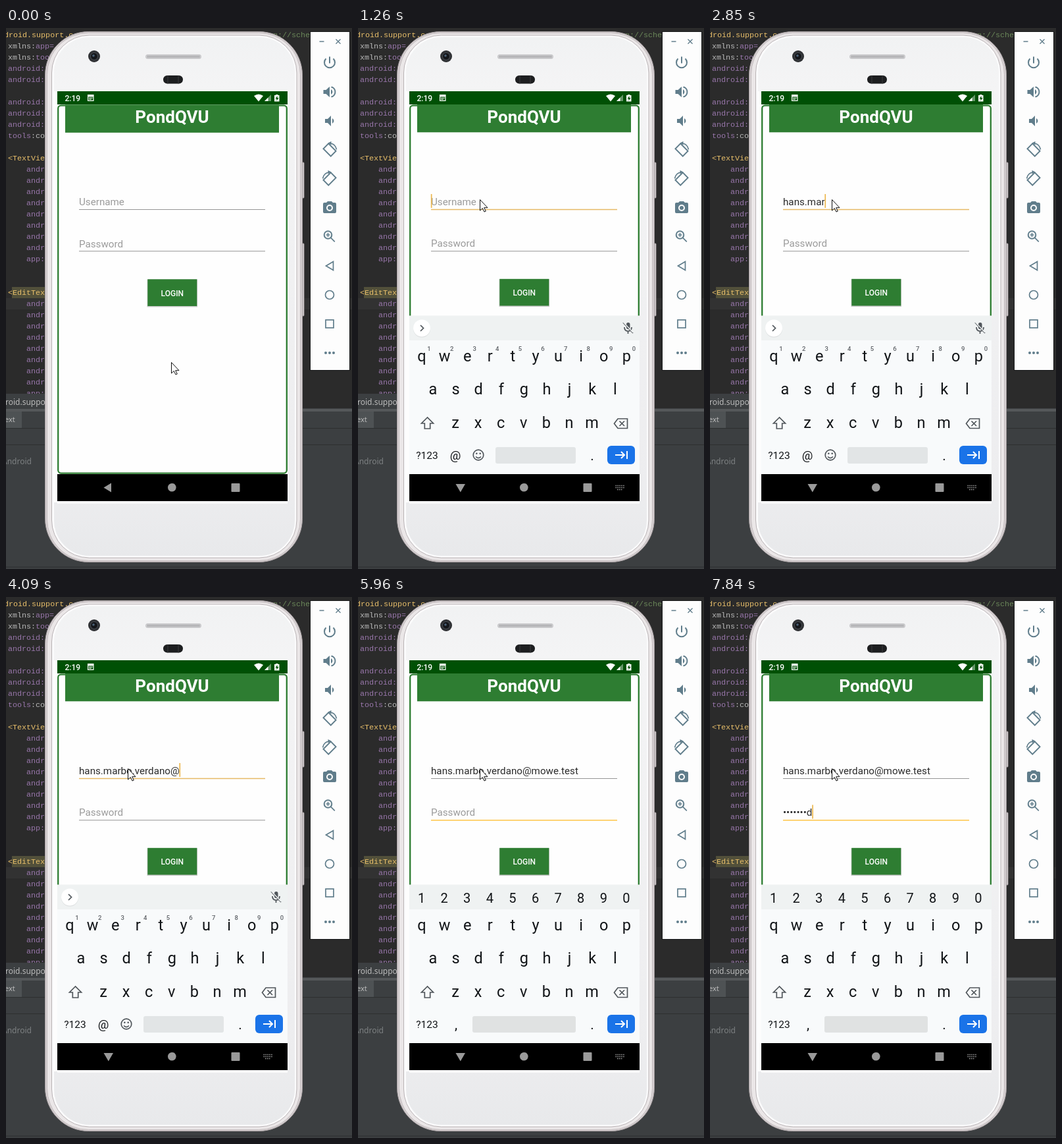
These frames come from a looping animation (526 px wide and 821 px high, 8000 ms). An HTML page:

```html
<!DOCTYPE html>
<html lang="en">
<head>
<meta charset="utf-8">
<title>Login form demo</title>
<style>
html, body { margin: 0; width: 100%; height: 100%; overflow: hidden; background: #3c3f41; }
svg { display: block; font-family: Roboto, sans-serif; }
text { white-space: pre; }
.mono { font: 11.7px "Liberation Mono", monospace; }
.ide { font: 12px "Noto Sans", sans-serif; fill: #bbb; }
.field { font-size: 15.2px; }
.key { text-anchor: middle; fill: #111417; }
.icon { fill: none; stroke: #607d8b; stroke-width: 2; }
.solid { fill: #607d8b; stroke: none; }
</style>
</head>
<body>
<svg width="526" height="821" viewBox="0 0 526 821">
  <defs>
    <linearGradient id="face" x2="0" y2="1">
      <stop stop-color="#f1f2f3"/><stop offset=".1" stop-color="#f4f4f5"/>
      <stop offset=".85" stop-color="#ededef"/><stop offset="1" stop-color="#e8e9eb"/>
    </linearGradient>
    <clipPath id="screen"><rect x="78" y="96" width="350" height="581"/></clipPath>
  </defs>

  <!-- code editor -->
  <rect width="526" height="577" fill="#2b2b2b"/>
  <rect y="410" width="526" height="17" fill="#323232"/>
  <rect x="9" y="393" width="60" height="17" fill="#52503a"/>
  <g id="code" class="mono"></g>
  <rect y="555" width="250" height="23" fill="#3c3f41"/>
  <rect y="577" width="526" height="244" fill="#3c3f41"/>
  <rect y="578" width="526" height="4" fill="#55585a"/>
  <rect y="582" width="24" height="25" fill="#4e5254"/>
  <path d="M0 607.5H526M0 632.5H526M0 818H526" stroke="#2d2f30"/>
  <g class="ide">
    <text x="-1" y="572">roid.support</text>
    <text x="-2" y="598" font-size="11">ext</text>
    <text x="-6" y="662" style="fill:#7d8082">Android</text>
  </g>

  <!-- phone -->
  <g fill="#d9d4d6" stroke="#a39c9e">
    <rect x="448" y="204" width="5" height="54" rx="1"/>
    <rect x="448" y="327" width="5" height="110" rx="1"/>
    <rect x="59.5" y="5.5" width="391" height="805" rx="66" fill="#d6d0d2"/>
  </g>
  <rect x="62.5" y="7.5" width="385" height="801" rx="63" fill="#ebe7e8" stroke="#c4bdbf"/>
  <rect x="69.5" y="11" width="372.500" height="793" rx="57" fill="#fbfbfc" stroke="#b9b3b5"/>
  <rect x="73" y="14" width="366" height="787" rx="54" fill="url(#face)"/>
  <rect x="73" y="96" width="5" height="624" fill="#fdfdfd"/>
  <rect x="78" y="718" width="350" height="4" fill="#fafafb"/>
  <circle cx="134" cy="43" r="9" fill="#2f3134"/>
  <circle cx="134" cy="43" r="5.5" fill="#14161a" stroke="#4b4f55"/>
  <circle cx="133" cy="42" r="1.8" fill="#4a6076"/>
  <rect x="212" y="40" width="85" height="7" rx="3.5" fill="#c9c9cb"/>
  <path d="M215 43.5H295" stroke="#a3a3a6" stroke-width="3" stroke-dasharray="1 1"/>
  <rect x="239" y="72" width="30" height="12.5" rx="6.2" fill="#1d1e20"/>
  <path d="M246 72v12.500M262 72v12.500" stroke="#3a3b3d"/>

  <!-- app -->
  <rect x="78" y="96" width="350" height="581" fill="#fefefe"/>
  <rect x="79.200" y="117.600" width="347.600" height="558" rx="4.500" fill="none" stroke="#2e7d32" stroke-width="2.300"/>
  <g id="form">
    <rect x="90" y="116" width="325" height="42.300" fill="#2e7d32"/>
    <text x="252.500" y="143.500" text-anchor="middle" font-size="26" font-weight="700" fill="#fff">PondQVU</text>
    <text id="user" class="field" x="111" y="268.500"></text>
    <text id="pass" class="field" x="111" y="332.300"></text>
    <rect x="214.500" y="381" width="76.500" height="42" fill="#000" fill-opacity=".2"/>
    <rect x="215.300" y="380.800" width="75" height="40.700" fill="#2e7d32"/>
    <text x="252.800" y="406" text-anchor="middle" font-size="12" font-weight="500" fill="#fff">LOGIN</text>
  </g>
  <path id="userLine" d="M111 275.500H394"/>
  <path id="passLine" d="M111 338.700H394"/>
  <rect id="caret" width="1.700" height="21" fill="#ecb74e"/>

  <rect x="78" y="96" width="350" height="20" fill="#005005"/>
  <g fill="#fff">
    <text x="89.500" y="110.500" font-size="12" font-weight="500">2:19</text>
    <path d="M124 101h9.500v10H124zm1.200 3.500v5.300h7.100v-5.300zM126 105.700h5.500v1H126zm0 2h4v1h-4z" fill-rule="evenodd"/>
    <path d="M377 103q7-5 14 0l-7 8.500z"/>
    <path d="M403 101v10h-10z" fill-opacity=".4"/><path d="M398.500 105.500V111H393z"/>
    <path d="M408 102h2v-1h3.500v1h2v9.500H408z"/>
    <path d="M412.500 103l-3 4.500h2v3l3-4.500h-2z" fill="#005005"/>
  </g>

  <!-- keyboard -->
  <g clip-path="url(#screen)">
    <g id="keyboard">
      <rect x="78" y="437" width="350" height="240" fill="#f8fafb"/>
      <rect x="78" y="436.500" width="350" height="37.500" fill="#eff2f2"/>
      <g id="letters" class="key" font-size="23.500"></g>
      <g fill="none" stroke="#50565b" stroke-width="1.700">
        <path d="M105.500 591l-9 9h4.800v8h8.400v-8h4.800z"/>
        <path d="M395 593h14.500v14.500H395l-5.500-7.200zM397.500 596.500l7.500 7.500m0-7.500l-7.500 7.500"/>
      </g>
      <text x="105" y="653.500" class="key" font-size="15.500">?123</text>
      <text x="356" y="656" class="key" font-size="21">.</text>
      <rect x="379" y="634" width="42" height="28" rx="6" fill="#1a73e8"/>
      <path d="M391 648h14m-5-5l5 5-5 5M409 642v12" fill="none" stroke="#fff" stroke-width="2"/>
      <g id="mailKeys">
        <g id="hints" class="key" font-size="9.500" font-weight="500" style="fill:#5f6368"></g>
        <circle cx="97" cy="456.500" r="13" fill="#d9dcdd"/>
        <circle cx="97" cy="455.500" r="13" fill="#fff"/>
        <g fill="none" stroke="#50565b" stroke-width="1.700">
          <path d="M95 451l4.500 4.500-4.500 4.500"/>
          <path d="M405 454q0 6 5.500 6t5.500-6M410.500 460v4M403 447l15 16"/>
          <circle cx="183" cy="648" r="7.800"/>
          <path d="M179 650.500q4 4 8 0"/>
        </g>
        <rect x="408" y="447" width="5.500" height="10" rx="2.700" fill="#50565b"/>
        <path d="M403 446l15 16" stroke="#eff2f2" stroke-width="1.300"/>
        <circle cx="180.300" cy="645.800" r="1.300" fill="#50565b"/><circle cx="185.700" cy="645.800" r="1.300" fill="#50565b"/>
        <text x="148" y="655" class="key" font-size="18.500">@</text>
        <rect x="209" y="636" width="122" height="25" rx="3" fill="#e2e5e6"/>
      </g>
      <g id="passKeys">
        <g id="digits" class="key" font-size="20"></g>
        <text x="149" y="656" class="key" font-size="21">,</text>
        <rect x="174" y="636" width="157" height="25" rx="3" fill="#e0e2e2"/>
      </g>
    </g>
  </g>

  <!-- navigation bar -->
  <rect x="78" y="677" width="350" height="41" fill="#000"/>
  <g fill="#9a9a9a">
    <path id="back"/>
    <circle cx="252.300" cy="697.200" r="6.300"/>
    <rect x="342.500" y="691" width="13" height="13" rx="1"/>
    <path id="imeIcon" d="M391.500 694.500H405M391.500 697.500H405M394 700.500h8.500" stroke="#9a9a9a" stroke-width="1.600" stroke-dasharray="1.600 1.300"/>
  </g>

  <!-- emulator toolbar -->
  <rect x="462.500" y="5.500" width="60" height="514" fill="#fdfdfd" stroke="#151617"/>
  <path d="M476.500 20.500h7M501.500 17l7 7m0-7l-7 7" stroke="#607d8b" stroke-width="1.300"/>
  <g class="icon">
    <path d="M492 43.500v10M486.500 46.500a8 8 0 1 0 11 0"/>
    <path class="solid" d="M482.500 94v6h4l5.500 5V89l-5.500 5z"/>
    <path d="M494.500 89.500a7.700 7.700 0 0 1 0 15"/>
    <path class="solid" d="M494 93a4.500 4.500 0 0 1 0 8z"/>
    <path class="solid" d="M485 138v6h4l5 5v-16l-5 5zM496 137a4.500 4.500 0 0 1 0 8z"/>
    <g id="turn">
      <rect x="486.500" y="177" width="11" height="16" transform="rotate(-45 492 185)" stroke-width="1.900"/>
      <path d="M493 175q8 1 9.500 9.500" stroke-width="1.700"/>
      <path class="solid" d="M489.500 174.500l5-2.500v5.500z"/>
    </g>
    <use href="#turn" transform="matrix(-1 0 0 1 984 44)"/>
    <path class="solid" fill-rule="evenodd" d="M489 263l-2 2h-3q-2 0-2 2v12q0 2 2 2h16q2 0 2-2v-12q0-2-2-2h-3l-2-2zm3 5a5 5 0 1 1 0 10 5 5 0 0 1 0-10z"/>
    <circle class="solid" cx="492" cy="273" r="3"/>
    <circle cx="489.500" cy="314" r="5.800"/>
    <path d="M493.800 318.300l6 6M486.500 314h6m-3-3v6" stroke-width="1.700"/>
    <path d="M497.500 354.500v13l-11-6.500z" stroke-width="1.700"/>
    <circle cx="492" cy="405" r="6.500" stroke-width="1.700"/>
    <rect x="486" y="443" width="12" height="12" stroke-width="1.700"/>
    <path d="M486 493h.01m5.990 0h.01m5.990 0h.01" stroke-width="4" stroke-linecap="round"/>
  </g>

  <path id="pointer" d="M.5.500V17l3.800-3.500L7 19l2.300-1-2.600-5.300H12z" fill="#fff" stroke="#111" stroke-width="1"/>
</svg>
<script>
const $ = id => document.getElementById(id);
const EMAIL = "hans.marbo.verdano@mowe.test", SECRET = "password";

function addText(parent, x, y, str, fill) {
  const el = document.createElementNS("http://www.w3.org/2000/svg", "text");
  el.setAttribute("x", x);
  el.setAttribute("y", y);
  if (fill) el.setAttribute("fill", fill);
  el.textContent = str;
  $(parent).append(el);
}
const addRow = (parent, x, y, chars) =>
  [...chars].forEach((c, i) => addText(parent, x + i * 34.6, y, c));

// Editor text, one line every 17 px
const YELLOW = "#e8bf6a", PURPLE = "#9876aa", GREY = "#bababa";
const line = (n, x, str, fill) => addText("code", x, 14 + n * 17, str, fill);
line(0, -3, "droid.support.c", YELLOW);
line(0, 406, "p://schemas", "#6a8759");
for (const [n, name] of [[1, "app="], [2, "tools"]]) {
  line(n, 3, "xmlns:", GREY);
  line(n, 45, name, PURPLE);
}
for (const n of [3, 4, 6, 7, 8]) line(n, 3, "android:", PURPLE);
line(9, 3, "tools", PURPLE);
line(9, 38, ":co", GREY);
line(11, 3, "<TextView", YELLOW);
line(23, 3, "<EditText", YELLOW);
for (let n = 12; n < 32; n++) if (n < 20 || n > 23) line(n, 31, "android", PURPLE);
line(20, 31, "app:", PURPLE);
line(32, 31, "app:", PURPLE);

addRow("letters", 97, 506.300, "qwertyuiop");
addRow("letters", 114, 556, "asdfghjkl");
addRow("letters", 148, 606.700, "zxcvbnm");
addRow("hints", 108, 490, "1234567890");
addRow("digits", 96.500, 463.500, "1234567890");

// Characters typed in a run of evenly timed steps
function burst(t, start, end, steps, count) {
  if (t < start) return 0;
  const k = Math.min(steps - 1, Math.floor((t - start) / (end - start) * (steps - 1) + .05));
  return Math.round(count * (k + 1) / steps);
}
const within = (t, a, b) => t >= a && t < b;

function setField(id, value, hint) {
  $(id).textContent = value || hint;
  $(id).setAttribute("fill", value ? "#2b2b2b" : "#9b9b9b");
}
function setLine(id, focused, color) {
  $(id).setAttribute("stroke", focused ? color : "#969696");
  $(id).setAttribute("stroke-width", focused ? 1.6 : 1);
}
const show = (id, on) => $(id).setAttribute("visibility", on ? "inherit" : "hidden");

function draw(t) {
  const onPass = t >= 5250, onUser = t >= 830 && !onPass;
  const userLen = burst(t, 2120, 3130, 8, 11) + burst(t, 3410, 4090, 6, 8) + burst(t, 4390, 5110, 6, 9);
  const passLen = burst(t, 6820, 7250, 4, 4) + burst(t, 7560, 7840, 3, 4);

  setField("user", EMAIL.slice(0, userLen), "Username");
  setField("pass", passLen ? "•".repeat(passLen - 1) + SECRET[passLen - 1] : "", "Password");
  setLine("userLine", onUser, "#e5b966");
  setLine("passLine", onPass, "#ffc548");
  $("form").setAttribute("transform", `translate(0 ${t < 120 ? .5 : 0})`);

  const field = $(onPass ? "pass" : "user"), length = onPass ? passLen : userLen;
  $("caret").setAttribute("x", 110.800 + (length ? field.getComputedTextLength() : 0));
  $("caret").setAttribute("y", onPass ? 315.500 : 252);
  show("caret", t >= 830 && !within(t, 1410, 1840) && !within(t, 5960, 6390));

  show("keyboard", t >= 1130);
  $("keyboard").setAttribute("transform", `translate(0 ${t < 1260 ? 45 : 0})`);
  show("mailKeys", !onPass);
  show("passKeys", onPass);
  $("back").setAttribute("d", t < 830 ? "M160 690.500v14l-11.500-7z" : "M148.500 692h14.500l-7.200 12.500z");
  show("imeIcon", t >= 830);

  const [x, y] = t < 120 ? [251, 507] : t < 250 ? [236, 440] : t < 390 ? [203, 322] : [185, 260];
  $("pointer").setAttribute("transform", `translate(${x} ${y})`);
}

function tick() {
  draw(performance.now() % 8000);
  requestAnimationFrame(tick);
}
tick();
</script>
</body>
</html>
```
